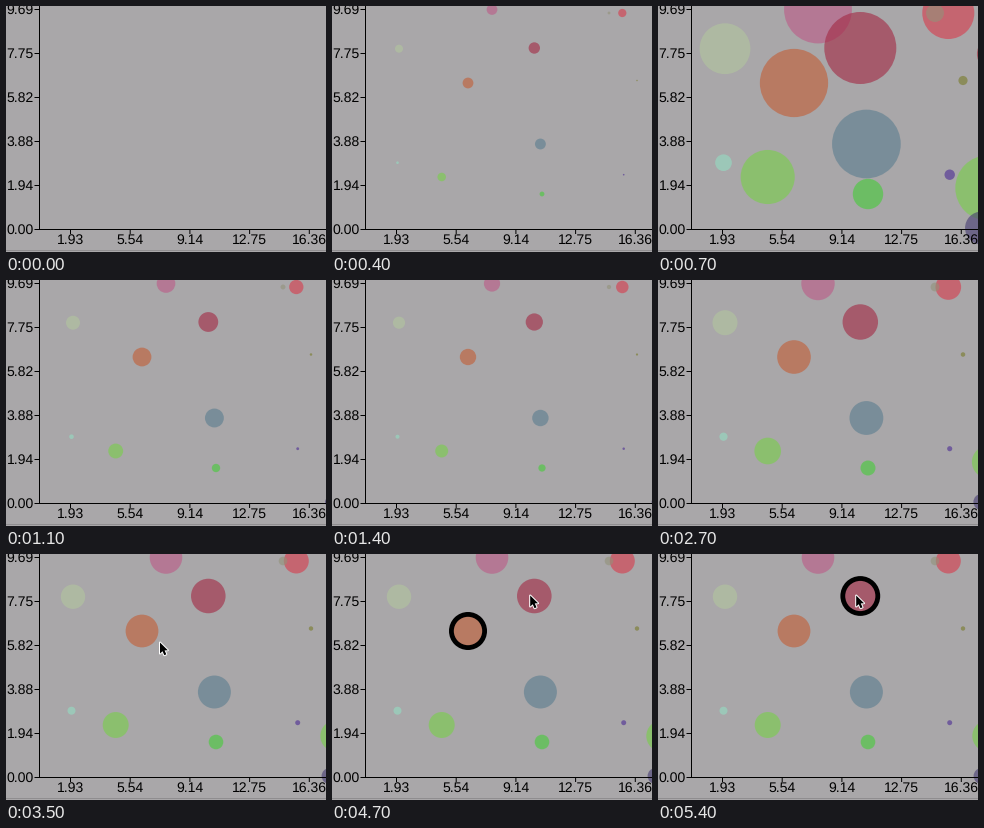
These frames come from a looping animation (320x246 px, 5500 ms). A matplotlib script:

```python
import numpy as np
import matplotlib.pyplot as plt
from matplotlib.animation import FuncAnimation
from matplotlib.patches import Circle, Polygon

W, H, DPI = 320, 246, 100
FRAMES, STEP = 55, 100
PX = 72 / DPI
BG = "#a9a7a9"
LEFT, BASE = 33.5, 223.5

# x, y, settled radius, colour
BUBBLES = [
    (160, 3.5, 16.3, "#bc5a87"),
    (202.3, 42, 17.3, "#a32843"),
    (136, 77, 16.4, "#c35c34"),
    (67, 42.7, 12.2, "#b2c69e"),
    (208.4, 138, 16.5, "#5a7d8f"),
    (109.7, 171, 13, "#78d048"),
    (210, 188, 7.3, "#44cd37"),
    (65.5, 156.7, 4, "#94dec3"),
    (290.3, 7, 12.5, "#d9394b"),
    (277, 7, 4.3, "#93927a"),
    (305, 74.5, 2.2, "#787a28"),
    (291.7, 168.7, 2.5, "#4b2b94"),
    (330, 182, 15.7, "#78d048"),
    (323.5, 222, 7.9, "#463c73"),
    (336, 48, 8.2, "#a52d3c"),
]
RED, ORANGE = BUBBLES[1:3]
ORANGE_ON, RED_ON = 4000, 5000

# Pointer stops: time, x, y
STOPS = [(3200, 205, 210), (3500, 153.5, 88), (3800, 136, 72),
         (4300, 136, 72), (4700, 197.7, 41)]
ARROW = 0.8 * np.array([(0, 0), (0, 13.8), (3.2, 10.9), (5.4, 15.9),
                        (7.9, 14.8), (5.7, 9.9), (9.8, 9.7)])

plt.rcParams["text.hinting"] = "none"
fig = plt.figure(figsize=(W / DPI, H / DPI), dpi=DPI, facecolor=BG)
ax = fig.add_axes([0, 0, 1, 1])
ax.set_xlim(0, W)
ax.set_ylim(H, 0)
ax.axis("off")


def line(x0, y0, x1, y1, color="black"):
    ax.plot([x0, x1], [y0, y1], color=color, lw=PX, zorder=4,
            solid_capstyle="butt", snap=False)


def label(x, y, value, ha):
    ax.text(x, y, f"{value:.2f}", ha=ha, va="baseline", color="black",
            family="Liberation Sans", fontsize=14 * PX, zorder=5,
            clip_on=True)


def draw_axes():
    line(LEFT, 0, LEFT, BASE + 0.5)
    line(LEFT - 0.5, BASE, W, BASE)
    line(0, H - 1.5, W, H - 1.5, "#8f8d8f")
    for i in range(6):
        y = BASE - 44 * i
        line(LEFT - 5, y, LEFT, y)
        label(LEFT - 5.6, y + 4.2, 1.9385 * i, "right")
    for i in range(5):
        x = 64.5 + 59.7 * i
        line(x, BASE, x, BASE + 4.5)
        label(x, BASE + 14.7, 1.93 + 3.607 * i, "center")


def scale_at(t):
    """Underdamped spring that starts fast and settles at 1."""
    if t < 330:
        return 0
    u = t / 1000 - 0.5
    return 1 + 1.19 * np.exp(-0.71 * u * u) * np.sin(6.04 * u)


def tip_at(t):
    for (t0, *a), (t1, *b) in zip(STOPS, STOPS[1:]):
        if t < t1:
            u = max(0, (t - t0) / (t1 - t0))
            u = u * u * (3 - 2 * u)
            return np.array(a) * (1 - u) + np.array(b) * u
    return np.array(STOPS[-1][1:])


def make_ring(bubble):
    x, y, r, _ = bubble
    return ax.add_patch(Circle((x, y), r + 0.2, fill=False, ec="black",
                               lw=4.8 * PX, zorder=6))


draw_axes()
dots = [ax.add_patch(Circle((x, y), 0, fc=color, alpha=0.6, lw=0, zorder=3))
        for x, y, _, color in BUBBLES]
orange_ring, red_ring = make_ring(ORANGE), make_ring(RED)
halo = ax.add_patch(Polygon(ARROW, fc="white", ec="white", lw=2 * PX,
                            joinstyle="round", zorder=7))
arrow = ax.add_patch(Polygon(ARROW, fc="black", lw=0, zorder=8))


def update(i):
    t = i * STEP
    s = scale_at(t)
    for dot, (_, _, r, _) in zip(dots, BUBBLES):
        dot.set_radius(r * s)
        dot.set_visible(s > 0)
    orange_ring.set_visible(ORANGE_ON <= t < RED_ON)
    red_ring.set_visible(t >= RED_ON)
    tip = tip_at(t) + (0.5, 0.5)
    for shape in (halo, arrow):
        shape.set_xy(ARROW + tip)
        shape.set_visible(t >= STOPS[0][0])
    return [*dots, orange_ring, red_ring, halo, arrow]


anim = FuncAnimation(fig, update, frames=FRAMES, interval=STEP,
                     init_func=lambda: update(0), repeat=True, repeat_delay=0)
plt.show()
```
